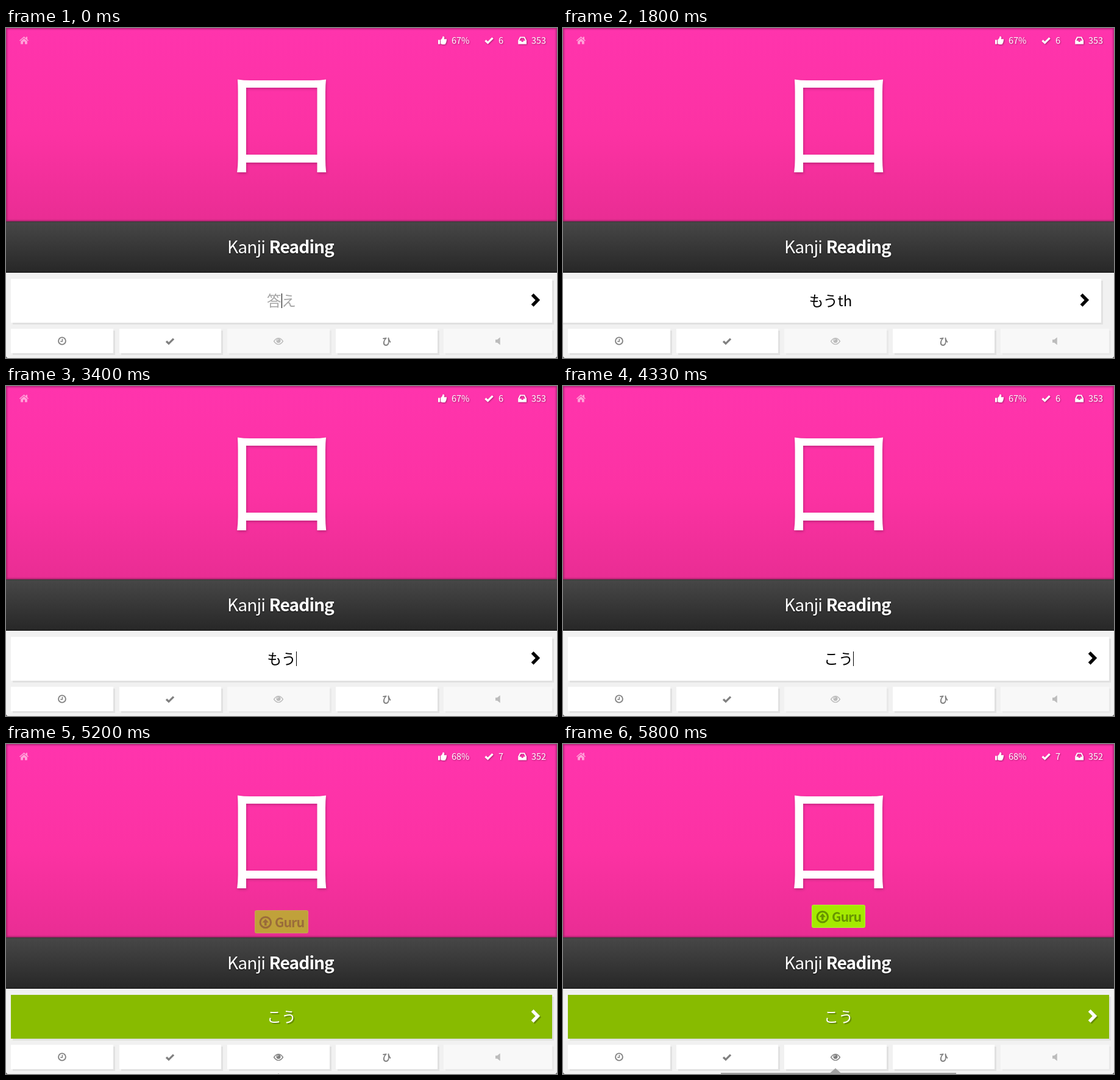
Recreate the animation shown at these times as an HTML page. Size 904 px wide and 542 px high, loop 5870 ms.

```html
<!DOCTYPE html>
<html lang="ja">
<head>
<meta charset="utf-8">
<title>Kanji Reading</title>
<style>
  html, body { margin: 0; width: 100%; height: 100%; overflow: hidden; background: #f1f1f1; }
  svg { display: block; width: 904px; height: 542px; }
  text { font-family: "Noto Sans CJK JP", "Noto Sans CJK", "Noto Sans", sans-serif; }
  .soft { filter: drop-shadow(1px 1px 1px rgba(0, 0, 0, .35)); }
  .lit { filter: drop-shadow(2px 2px 0 rgba(0, 0, 0, .25)); }
  .line { fill: none; stroke: currentColor; }
</style>
</head>
<body>
<svg viewBox="0 0 904 542" xmlns="http://www.w3.org/2000/svg">
  <defs>
    <linearGradient id="pink" x2="0" y2="1">
      <stop stop-color="#ff34ad"/><stop offset=".55" stop-color="#fc32a3"/><stop offset="1" stop-color="#e92d93"/>
    </linearGradient>
    <linearGradient id="dark" x2="0" y2="1">
      <stop stop-color="#474747"/><stop offset="1" stop-color="#272727"/>
    </linearGradient>
    <clipPath id="top"><rect width="904" height="318"/></clipPath>
    <filter id="blur" x="-5%" y="-5%" width="110%" height="110%"><feGaussianBlur stdDeviation="1.6"/></filter>
    <path id="check" d="M-6 0.2 L-2 4 L6 -4" fill="none" stroke="currentColor" stroke-width="3.3"/>
  </defs>

  <rect width="904" height="542" fill="#f1f1f1"/>
  <g clip-path="url(#top)">
    <rect width="904" height="318" fill="url(#pink)"/>
    <rect width="904" height="318" fill="none" stroke="#000" stroke-opacity=".38" stroke-width="3" filter="url(#blur)"/>
  </g>

  <path fill="#fff" fill-opacity=".55" d="M22 20.5 29.5 14 32.8 16.8V14.6H35V18.7L37 20.5 36 21.6 29.5 16.1 23 21.6ZM24.2 21.7 29.5 17.3 34.8 21.7V26.5H31V22.5H28V26.5H24.2Z"/>

  <g class="soft" fill="#fff" color="#fff" font-size="14.5">
    <path d="M709 19.5h3v7h-3ZM713 19.5C715 18.5 716 16.5 716.6 13.8 719.5 13 719.8 16 718.7 18.3H722.2C723.4 18.5 723.3 20 722.6 20.6 723 21.5 722.8 22.3 722.2 22.8 722.4 23.8 722 24.4 721.4 24.8 721.4 26.2 720.6 27 719 27H716.5L713 26Z"/>
    <use href="#check" x="792.5" y="20.3"/>
    <path fill-rule="evenodd" d="M843.2 14.5H851L854 20.6V26.5H840.2V20.6ZM844.4 16.2 842.3 20.8H845.2L846 22.8H848.5L849.2 20.8H852L849.9 16.2Z"/>
    <text id="score" x="731" y="26"></text>
    <text id="done" x="808" y="26"></text>
    <text id="left" x="862" y="26"></text>
  </g>

  <path role="img" aria-label="口" fill="#fff" style="filter:drop-shadow(1px 2px 2px rgba(0,0,0,.22))" fill-rule="evenodd"
    d="M380 84.5Q390 86 400 86H505Q515 86 525 84.5Q524 94 524 105V215Q524 226 525.2 237H510.5V221H394V237H379.2Q380.6 226 380.6 215V105Q380.6 94 380 84.5ZM394 98V208H510.5V98Z"/>

  <rect y="318" width="904" height="84" fill="url(#dark)"/>
  <rect y="317.5" width="904" height="1.5" fill="#333" fill-opacity=".6"/>
  <rect y="400.5" width="904" height="1.5" fill="#111" fill-opacity=".5"/>
  <g fill="#fff" font-size="28.2" letter-spacing="-.95" style="filter:drop-shadow(0 1px 1px rgba(0,0,0,.6))">
    <text x="363" y="370" font-weight="300">Kanji</text>
    <text x="431.5" y="370" font-weight="700">Reading</text>
  </g>

  <g id="badge">
    <rect x="408" y="264" width="88" height="38" rx="3" fill="#a4ea00"/>
    <rect x="408.5" y="264.5" width="87" height="37" rx="3" fill="none" stroke="#fff" stroke-opacity=".4" stroke-dasharray="1 1"/>
    <g fill="#000" fill-opacity=".37">
      <path fill-rule="evenodd" d="M415.5 284a10.3 10.3 0 1 0 20.6 0a10.3 10.3 0 1 0-20.6 0ZM418.6 284a7.2 7.2 0 1 1 14.4 0a7.2 7.2 0 1 1-14.4 0ZM425.8 278.2 431 284.2H427.6V289.2H424V284.2H420.6Z"/>
      <text x="441" y="292" font-size="21.5" font-weight="700" letter-spacing="-1">Guru</text>
    </g>
  </g>

  <g id="form">
    <rect x="11" y="415" width="888" height="72" fill="#e1e1e1"/>
    <rect id="field" x="8" y="412" width="888" height="72"/>
    <text id="answer" x="452" y="457" font-size="24" text-anchor="middle"></text>
    <rect id="caret" y="436" width="1" height="24" fill="#000"/>
    <path id="arrow" class="line" stroke-width="5.4" d="M863.6 437.8 872.4 446.8 863.6 455.8"/>
  </g>

  <g id="buttons"></g>
  <g color="#808080" fill="#808080">
    <g class="line" stroke-width="1.9"><circle cx="92" cy="514" r="5.9"/><path stroke-width="1.5" d="M92.4 510.4V514.7H89.3"/></g>
    <use href="#check" x="269" y="514.3"/>
    <g id="eye">
      <path class="line" stroke-width="1.4" d="M439.6 514.5Q443 509.4 447 509.4T454.4 514.5Q451 519.6 447 519.6T439.6 514.5Z"/>
      <circle cx="447" cy="513.6" r="3.6"/>
      <path d="M444.9 513.4Q445 511.6 447 511.5" fill="none" stroke="#fff" stroke-width=".9"/>
    </g>
    <text x="624.5" y="519.5" font-size="15" font-weight="700" text-anchor="middle">ひ</text>
    <path fill-opacity=".5" d="M803 511.7H806L810.7 508V520.5L806 516.8H803Z"/>
  </g>

  <path id="panel" fill="#a0a0a0" d="M259 540H438.5L447 532.5 455.5 540H645V560H259Z"/>
  <path fill="#555" d="M0 539Q.4 541.6 3 542H0ZM904 539Q903.6 541.6 901 542H904Z"/>
</svg>
<script>
const LOOP = 5870, SUBMIT = 4835, SHAKE = 1614, LEG = 400 / 7;
const typing = [
  [0, ""], [330, "m"], [500, "も"], [700, "もう"], [1070, "もうt"], [1240, "もうth"],
  [3130, "もうt"], [3270, "もう"], [3600, "も"], [3740, ""],
  [3950, "k"], [4120, "こ"], [4330, "こう"]
];
const $ = id => document.getElementById(id);
const set = (id, attrs) => { for (const k in attrs) $(id).setAttribute(k, attrs[k]); };
const clamp = p => Math.max(0, Math.min(1, p));
const swing = p => .5 - Math.cos(clamp(p) * Math.PI) / 2;
const mix = (a, b, p) => a + (b - a) * p;

function addRect(x, y, width, fill, id) {
  const rect = document.createElementNS("http://www.w3.org/2000/svg", "rect");
  const attrs = { x, y, width, height: 40, fill };
  if (id) attrs.id = id;
  for (const k in attrs) rect.setAttribute(k, attrs[k]);
  $("buttons").append(rect);
}
[[8, 168], [186, 167], [363, 168, "eyeButton"], [541, 167], [718, 178, "", true]].forEach(([x, width, id, off]) => {
  addRect(x + 3, 497, width, off ? "#e9e9e9" : "#e1e1e1", id && id + "Shadow");
  addRect(x, 494, width, off ? "#f8f8f8" : "#fff", id);
});

// Alternating swings of 20px; the last one returns home in half the time.
function shakeOffset(t) {
  const leg = (t - SHAKE) / LEG;
  if (leg <= 0 || leg >= 6.5) return 0;
  const n = Math.floor(leg), side = n % 2 ? 1 : -1;
  if (n === 6) return 20 * (1 - swing((leg - 6) * 2));
  return mix(n ? -20 * side : 0, 20 * side, swing(leg - n));
}

function draw(t) {
  const right = t >= SUBMIT;
  const [since, value] = typing.filter(step => step[0] <= t).pop();

  $("score").textContent = right ? "68%" : "67%";
  $("done").textContent = right ? "7" : "6";
  $("left").textContent = right ? "352" : "353";

  const green = clamp((t - SUBMIT) / 220);
  const ink = right ? "#fff" : "#000";
  set("form", { transform: `translate(${shakeOffset(t)} 0)` });
  set("field", { fill: `rgb(${mix(255, 136, green)},${mix(255, 187, green)},${mix(255, 0, green)})` });
  $("answer").textContent = value || "答え";
  set("answer", { fill: value ? ink : "#a6a6a6", "font-weight": value ? 400 : 300, class: right ? "lit" : "" });
  set("arrow", { color: ink, class: right ? "line lit" : "line" });

  const half = value ? $("answer").getComputedTextLength() / 2 : 0;
  const caretOn = !right && (t - since) % 1000 < 500;
  set("caret", { x: Math.round(452 + half), visibility: caretOn ? "visible" : "hidden" });

  set("eye", { opacity: right ? 1 : .5 });
  set("eyeButton", { fill: right ? "#fff" : "#f8f8f8" });
  set("eyeButtonShadow", { fill: right ? "#e1e1e1" : "#e9e9e9" });

  const rise = swing((t - SUBMIT) / 640);
  set("badge", { opacity: rise, transform: `translate(0 ${mix(23, 0, rise)})` });
  set("panel", { transform: `translate(0 ${mix(10, 0, clamp((t - 5140) / 400))})` });
}

const start = performance.now();
function tick() {
  draw((performance.now() - start) % LOOP);
  requestAnimationFrame(tick);
}
tick();
</script>
</body>
</html>
```
